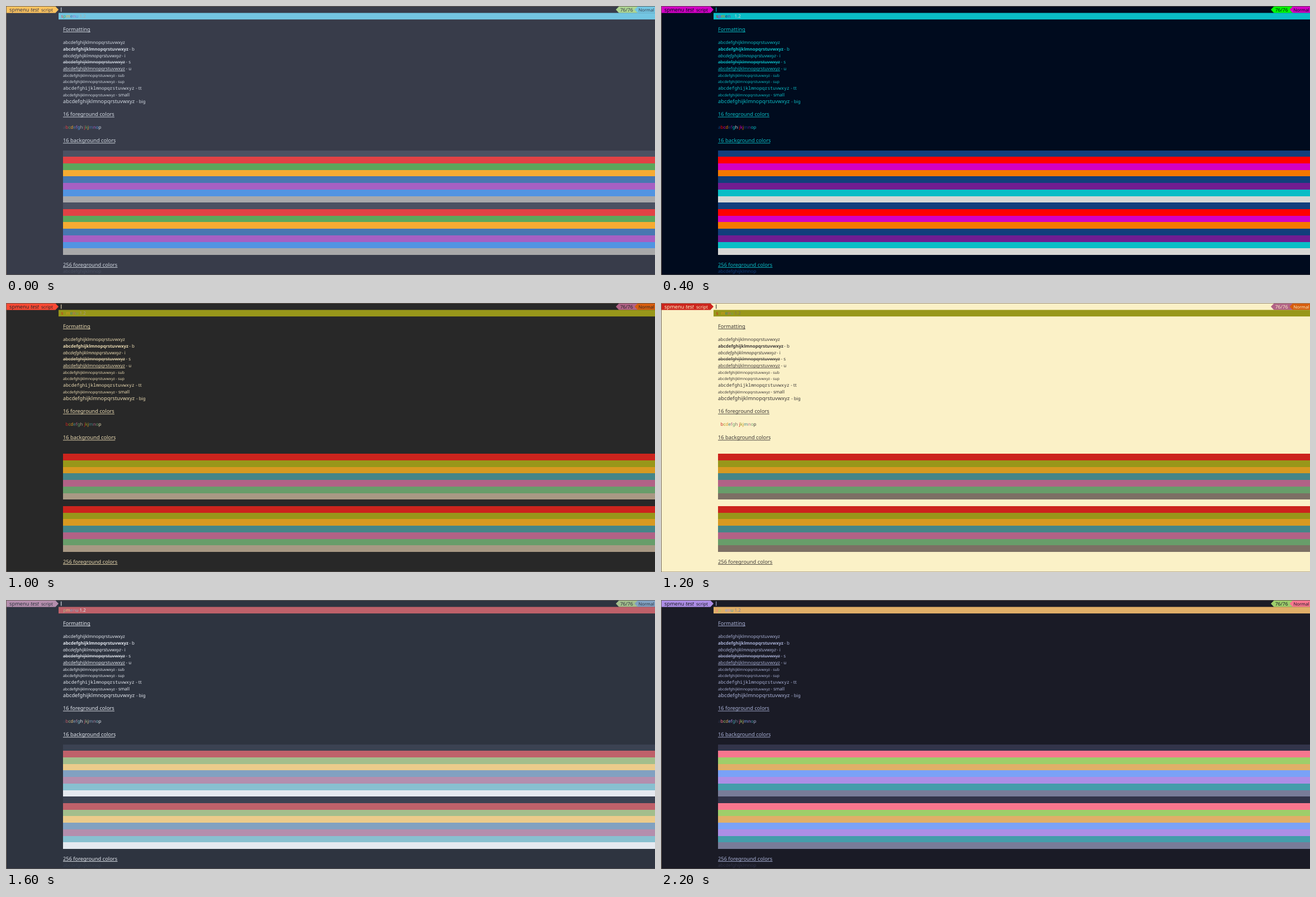
Animation of 1161 by 482 pixels, one loop 2.4 s. Source, as an HTML page:

```html
<!DOCTYPE html>
<html lang="en">
<head>
<meta charset="utf-8">
<title>Menu themes</title>
<style>
  html, body { margin: 0; width: 100%; height: 100%; overflow: hidden; }
  svg { display: block; background: var(--bg); }
  text { font-family: "Noto Sans", "Open Sans", sans-serif; text-rendering: geometricPrecision; white-space: pre; }
</style>
</head>
<body>
<svg id="stage" width="1161" height="482" viewBox="0 0 1161 482"></svg>
<script>
const STEP = 200, ROW = 11.72, TOP = 12.4, LEFT = 102, WIDTH = 1161;
const NORMAL = 8.05, BIG = 9.3, SMALL = 6.75;
const ALPHABET = 'abcdefghijklmnopqrstuvwxyz';
const stage = document.getElementById('stage');

// Background, foreground, eight palette colours | title, counter, mode, selection
// (the last four are palette indices or colours).
const themes = [
  '383c4a d3dae3 4b5162 e14245 5ca75b f6ab32 4877b1 a660c3 5294e2 a9a9aa|fdc35f add692 73c5e2 73c5e2',
  '1e1e2e cdd6f4 45475a f38ba8 a6e3a1 f9e2af 89b4fa f5c2e7 94e2d5 bac2de|4 2 5 1',
  '000b1e 0abdc6 123e7c ff0000 d300c4 f57800 123e7c 711c91 0abdc6 d7d7d5|2 00ff00 2 6',
  '282c34 bbc2cf 1c1f24 ff6c6b 98be65 da8548 51afef c678dd 5699af abb2bf|4 2 5 1',
  '282a36 f8f8f2 21222c ff5555 50fa7b f1fa8c bd93f9 ff79c6 8be9fd f8f8f2|5 2 4 4',
  '282828 ebdbb2 282828 cc241d 98971a d79921 458588 b16286 689d6a a89984|fb4934 5 d65d0e 2',
  'fbf1c7 3c3836 fbf1c7 cc241d 98971a d79921 458588 b16286 689d6a 7c6f64|1 5 d65d0e 2',
  '1d2021 d4be98 1d2021 ea6962 a9b665 d8a657 7daea3 d3869b 89b482 d4be98|3 ef938e 2 1',
  '2e3440 e5e9f0 3b4252 bf616a a3be8c ebcb8b 81a1c1 b48ead 88c0d0 e5e9f0|5 2 4 1',
  '002b36 839496 073642 dc322f 859900 b58900 268bd2 d33682 2aa198 eee8d5|3 cb4b16 2 1',
  'fdf6e3 657b83 eee8d5 dc322f 859900 b58900 268bd2 d33682 2aa198 073642|3 cb4b16 2 1',
  '1a1b26 a9b1d6 32344a f7768e 9ece6a e0af68 7aa2f7 ad8ee6 449dab 787c99|5 2 1 3'
].map(parseTheme);

function parseTheme(line) {
  const [base, roles] = line.split('|').map(part => part.split(' '));
  const [bg, fg, ...palette] = base;
  const theme = { bg, fg };
  palette.forEach((color, i) => theme['c' + i] = color);
  ['title', 'count', 'mode', 'select'].forEach((name, i) =>
    theme[name] = roles[i].length === 1 ? palette[roles[i]] : roles[i]);
  return theme;
}

function add(tag, attrs, parent = stage) {
  const node = document.createElementNS('http://www.w3.org/2000/svg', tag);
  for (const key in attrs) node.setAttribute(key, attrs[key]);
  return parent.appendChild(node);
}

const fill = name => `fill:var(--${name})`;
const rowTop = row => TOP + row * ROW;
const baseline = row => rowTop(row) + 8.8;

function rect(x, y, width, height, color) {
  return add('rect', { x, y, width, height, style: fill(color) });
}

function shape(points, color) {
  add('polygon', { points, style: fill(color) });
}

function label(x, y, content, size = NORMAL, color = 'fg', extra = '') {
  const node = add('text', { x, y, 'font-size': size, style: `${fill(color)};${extra}` });
  node.textContent = content;
  return node;
}

function letters(x, y, content, colorAt) {
  const line = label(x, y, '');
  [...content].forEach((char, i) =>
    add('tspan', { style: fill(colorAt(i)) }, line).textContent = char);
}

function heading(row, content, width) {
  const y = baseline(row) + 0.3;
  label(LEFT, y, content, BIG);
  rect(LEFT, y + 1.2, width, 0.9, 'fg');
}

function sample(row, suffix, suffixX, size, style = '', suffixSize = NORMAL) {
  const y = baseline(row);
  label(LEFT, y, ALPHABET, size, 'fg', style);
  label(suffixX, y, suffix, suffixSize);
}

function drawHeader() {
  shape('1,0.8 88.5,0.8 94,6.6 88.5,12.4 1,12.4', 'title');
  label(6, 10.2, 'spmenu', BIG, 'bg');
  label(44, 10.2, 'test', BIG, 'bg', 'font-style:italic');
  label(63, 10.2, 'script', NORMAL, 'bg');
  rect(98.2, 2.6, 1.1, 7.8, 'fg');
  shape('1091,6.6 1096.5,0.8 1131,0.8 1131,12.4 1096.5,12.4', 'count');
  shape('1124.5,6.6 1130,0.8 1161,0.8 1161,12.4 1130,12.4', 'mode');
  label(1098.7, 9.7, '76/76', 8.6, 'bg');
  label(1131.5, 9.7, 'Normal', 7.9, 'bg');
}

function drawList() {
  rect(94, TOP, WIDTH - 94, ROW, 'select');
  letters(98.5, baseline(0), 'spmenu 1.2', i => 'c' + Math.min(i + 1, 7));

  heading(2, 'Formatting', 49);
  label(LEFT, baseline(4), ALPHABET);
  sample(5, '- b', 220.3, 7.9, 'font-weight:700');
  sample(6, '- i', 207, NORMAL, 'font-style:italic');
  sample(7, '- s', 214.5, NORMAL);
  rect(LEFT, baseline(7) - 2.7, 111, 0.8, 'fg');
  sample(8, '- u', 214.5, NORMAL);
  rect(LEFT, baseline(8) + 1.1, 111, 0.8, 'fg');
  sample(9, '- sub', 196.3, SMALL, '', SMALL);
  sample(10, '- sup', 196.3, SMALL, '', SMALL);
  sample(11, '- tt', 232.2, 8.2, 'font-family:"Noto Sans Mono",monospace');
  sample(12, '- small', 196.3, SMALL);
  sample(13, '- big', 233, BIG);

  heading(15, '16 foreground colors', 92);
  letters(LEFT, baseline(17), 'abcdefghijkjmnop', i => i === 15 ? 'fg' : 'c' + i % 8);

  heading(19, '16 background colors', 93.3);
  for (let i = 0; i < 16; i++) {
    rect(LEFT, rowTop(21 + i), WIDTH - LEFT, ROW, 'c' + i % 8)
      .setAttribute('shape-rendering', 'crispEdges');
  }

  heading(38, '256 foreground colors', 97.5);
  label(LEFT, baseline(39), 'abcdefghijklmnop', NORMAL, 'c0');
}

function drawBorder() {
  const edge = { x: 0, y: 0, fill: '#75695f' };
  add('rect', { ...edge, width: 1, height: 482 });
  add('rect', { ...edge, width: WIDTH, height: 0.7 });
  add('rect', { ...edge, y: 481.5, width: WIDTH, height: 0.5 });
}

let current = -1;
function update(time) {
  const index = Math.floor(time / STEP) % themes.length;
  if (index === current) return;
  current = index;
  for (const [name, color] of Object.entries(themes[index])) {
    stage.style.setProperty('--' + name, '#' + color);
  }
}

function tick() {
  update(performance.now());
  requestAnimationFrame(tick);
}

drawHeader();
drawList();
drawBorder();
update(0);
requestAnimationFrame(tick);
</script>
</body>
</html>
```
